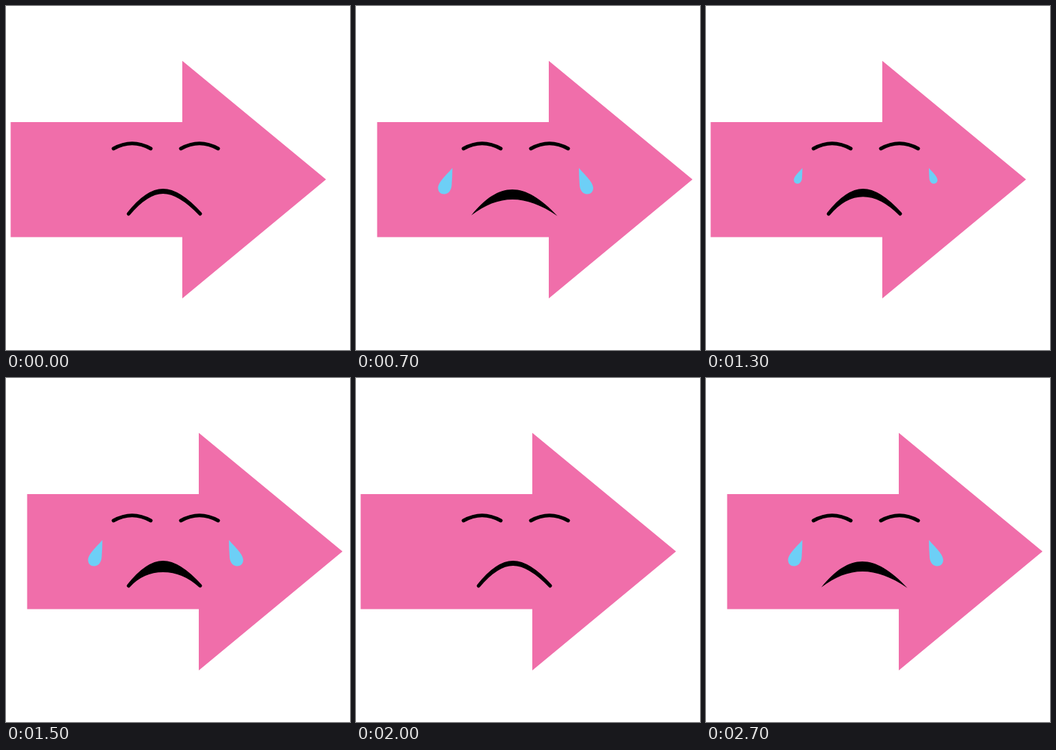
Recreate the animation shown at these times as an HTML page. Size 480 by 480 pixels, loop 2800 ms.

```html
<!DOCTYPE html>
<html lang="en">
<head>
<meta charset="utf-8">
<title>Crying arrow</title>
<style>
  html, body { margin: 0; width: 100%; height: 100%; overflow: hidden; background: #fff; }
  svg { display: block; width: 100vw; height: 100vh; }
  .line { fill: none; stroke: #000; stroke-width: 5; stroke-linecap: round; stroke-linejoin: round; }
</style>
</head>
<body>
<svg viewBox="0 0 480 480">
  <defs>
    <path id="eye" class="line" d="M150 199Q176 184.500 202 199"/>
    <path id="tear" fill="#6dcff6" d="M134.500 226C129 233 114.500 245 114.500 254C114.500 259 118 262.500 123 262.500C129 262.500 133 257 133.500 250C134 242 134.500 234 134.500 226Z"/>
  </defs>
  <path id="arrow" fill="#f06eaa" d="M6.500 162H246V76.500L446.500 242L246 408V322.500H6.500Z"/>
  <use href="#eye"/>
  <use href="#eye" x="94"/>
  <path id="mouth" stroke="#000" stroke-linecap="round" stroke-linejoin="round"/>
  <g id="tears">
    <use class="drop" href="#tear"/>
    <use class="drop" href="#tear" transform="matrix(-1 0 0 1 445.500 0)"/>
  </g>
</svg>
<script>
const LOOP = 2800, CRY = 1000, SHAKE = 200, SHIFT = 23;
const $ = id => document.getElementById(id);
const arrow = $("arrow"), mouth = $("mouth"), tears = $("tears"), tear = $("tear");

// Round-ended mouth between an upper and a lower lip curve
const lips = (low, inset) =>
  `M171 290C205 246.500 232 246.500 271 290C${232 + inset} ${low} ${205 - inset} ${low} 171 290Z`;
const wail = "M161 292C200 244 235 244 281 293C236 262 199 263 161 292Z";

const faces = [
  { from: 0,   mouth: lips(249.3, 0), line: 5, drop: 0 },
  { from: 300, mouth: lips(255, 4),   line: 5, drop: 0.6 },
  { from: 500, mouth: lips(261.3, 8), line: 5, drop: 1 },
  { from: 700, mouth: wail,           line: 0, drop: 1 }
];

let shown;
function setFace(face) {
  if (face === shown) return;
  shown = face;
  mouth.setAttribute("d", face.mouth);
  mouth.setAttribute("stroke-width", face.line);
  tears.style.display = face.drop ? "" : "none";
  // Grow from the tip of the drop
  const s = face.drop || 1;
  tear.setAttribute("transform", `translate(134.5 226) scale(${s}) translate(-134.5 -226)`);
}

function draw(time) {
  const t = time % LOOP;
  const right = Math.floor(t / SHAKE) % 2;
  arrow.setAttribute("transform", `translate(${right * SHIFT} 0)`);
  setFace(faces.filter(f => f.from <= t % CRY).pop());
}

const start = performance.now();
function tick() {
  draw(performance.now() - start);
  requestAnimationFrame(tick);
}
tick();
</script>
</body>
</html>
```
